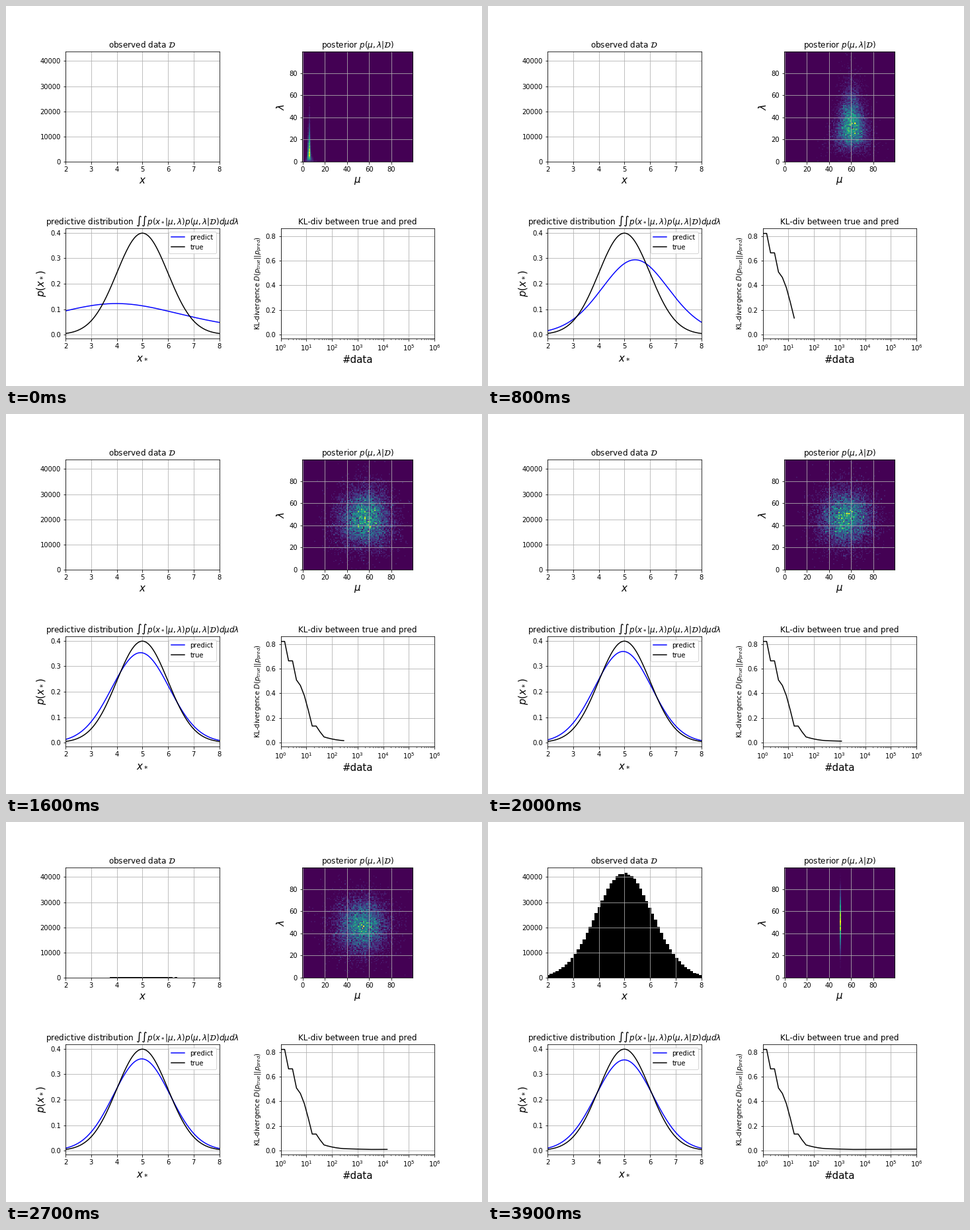
A matplotlib script that plays this animation: 720 px wide and 576 px high, repeating every 4 s.

```python
from math import exp, lgamma, pi, sqrt

import numpy as np
import matplotlib.pyplot as plt
from matplotlib.animation import FuncAnimation

plt.rcParams["text.kerning_factor"] = 6

FRAMES, INTERVAL = 40, 100
BINS = 100
SAMPLES = 10000
DATA_SD = sqrt(1.25)

sizes = np.logspace(0, 6, FRAMES)
data = np.random.default_rng(7).normal(5, DATA_SD, 10**6)

# key points of the fit: number of data, predictive mean, predictive scale
FIT = np.array([(1, 3.98, 3.01), (2, 4.2, 2.62), (8, 5.1, 2.08),
                (17, 5.42, 1.338), (24, 5.35, 1.4), (49, 5.1, 1.23),
                (289, 4.93, 1.127), (3500, 4.97, 1.102), (1e6, 5, DATA_SD)])


def normal(x):
    return np.exp(-(x - 5) ** 2 / 2) / sqrt(2 * pi)


def predictive(x, k):
    """Student t density with two more degrees of freedom than data."""
    n = int(sizes[k])
    dof = n + 2
    mean, scale = (np.interp(np.log(n), np.log(FIT[:, 0]), col)
                   for col in FIT.T[1:])
    peak = exp(lgamma((dof + 1) / 2) - lgamma(dof / 2)) / (sqrt(dof * pi) * scale)
    return peak * (1 + ((x - mean) / scale) ** 2 / dof) ** (-(dof + 1) / 2)


def divergence(k):
    x = np.linspace(-1, 11, 600)
    p = normal(x)
    return np.sum(p * np.log(p / predictive(x, k))) * (x[1] - x[0])


def posterior_counts(k):
    """Histogram of normal-gamma samples, measured in grid cells."""
    rng = np.random.default_rng(100 + k)
    shape = 1 + int(sizes[k]) / 2
    lam = rng.gamma(shape, 1 / shape, SAMPLES)
    row = BINS * (lam - lam.min()) / (lam.max() - lam.min())
    centre = np.interp(k, (0, 8, 16, 39), (6.4, 60.5, 56.5, 50.5))
    spread = min(0.6 + 0.8 * k, 12.5)
    col = centre + spread * rng.normal(size=SAMPLES) / np.sqrt(lam)
    # limited precision of mu leaves ever fewer distinct columns
    gap = 2.5 * 1.9 ** (k - 32)
    col = 50.5 + gap * np.round((col - 50.5) / gap)
    return np.histogram2d(row, col, bins=BINS, range=[(0, BINS)] * 2)[0]


def data_counts(k):
    half = DATA_SD * (0.57 + 0.119 * k)
    return np.histogram(data[:int(sizes[k])], bins=BINS,
                        range=(5 - half, 5 + half))


def label(ax, title, xlabel, ylabel, ysize=15):
    ax.set_title(title)
    ax.set_xlabel(xlabel, fontsize=15)
    ax.set_ylabel(ylabel, fontsize=ysize)
    ax.grid(True)


kl = [divergence(k) for k in range(FRAMES)]

fig, axes = plt.subplots(2, 2, figsize=(10, 8), dpi=72)
fig.subplots_adjust(left=.125, right=.9, bottom=.125, top=.88,
                    wspace=.4, hspace=.6)
(ax_data, ax_post), (ax_pred, ax_kl) = axes

label(ax_data, r"observed data $\mathcal{D}$", "$x$", "")
bars = ax_data.bar(np.arange(BINS), np.zeros(BINS), align="edge", color="black")
ax_data.set_xlim(2, 8)
ax_data.set_ylim(0, 43680)

label(ax_post, r"posterior $p(\mu, \lambda|\mathcal{D})$", r"$\mu$", r"$\lambda$")
image = ax_post.imshow(np.zeros((BINS, BINS)), origin="lower", cmap="viridis",
                       interpolation="nearest")
ax_post.set_xticks(range(0, BINS, 20))
ax_post.set_yticks(range(0, BINS, 20))

xs = np.linspace(2, 8, 200)
label(ax_pred, r"predictive distribution $\int\int p(x_*|\mu,\lambda)"
      r"p(\mu,\lambda|\mathcal{D})d\mu d\lambda$", "$x_*$", "$p(x_*)$")
pred_line, = ax_pred.plot(xs, predictive(xs, 0), color="blue", label="predict")
ax_pred.plot(xs, normal(xs), color="black", label="true")
ax_pred.set_xlim(2, 8)
ax_pred.set_ylim(-.0153, .4186)
ax_pred.legend(loc="upper right")

label(ax_kl, "KL-div between true and pred", "#data",
      r"KL-divergence $D(p_{true}||p_{pred})$", ysize=10)
kl_line, = ax_kl.plot([], [], color="black")
ax_kl.set_xscale("log")
ax_kl.set_xlim(1, 1e6)
ax_kl.set_ylim(-.0318, .8648)


def draw(k):
    counts, edges = data_counts(k)
    for bar, count, left in zip(bars, counts, edges):
        bar.set_x(left)
        bar.set_width(edges[1] - edges[0])
        bar.set_height(count)
    cells = posterior_counts(k)
    image.set_data(cells)
    image.set_clim(0, cells.max())
    pred_line.set_ydata(predictive(xs, k))
    kl_line.set_data(sizes[:k + 1], kl[:k + 1])
    return [*bars, image, pred_line, kl_line]


anim = FuncAnimation(fig, draw, frames=FRAMES, interval=INTERVAL, repeat=True)
plt.show()
```
